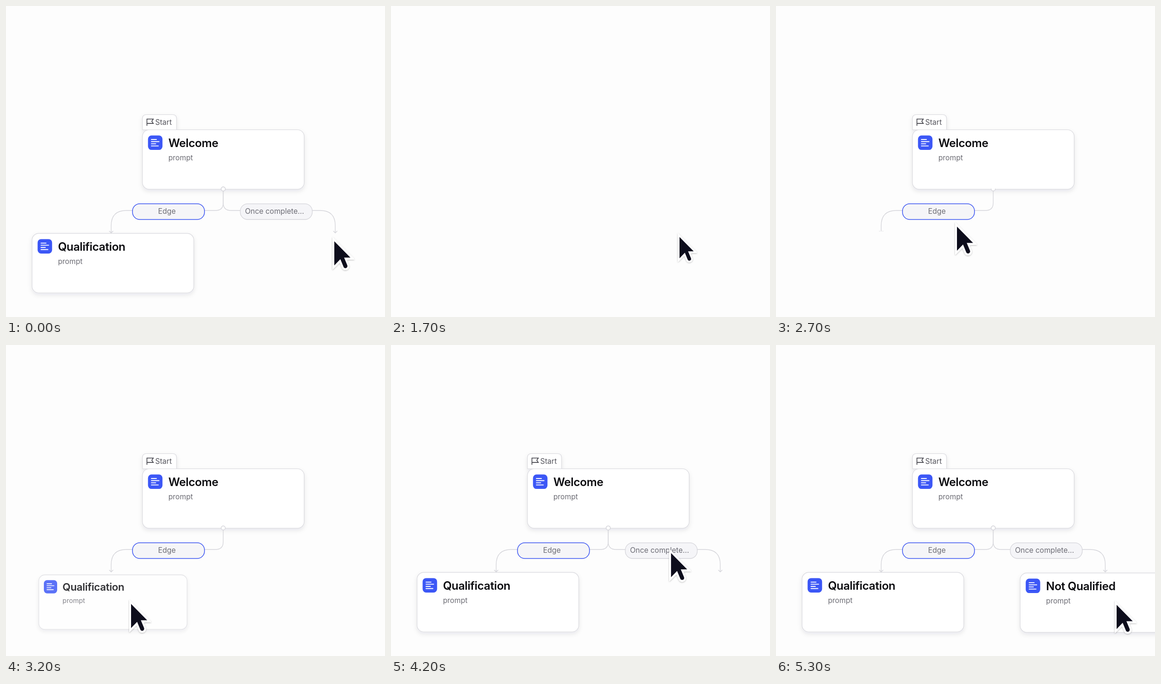
Write an HTML page that moves like this. It is 800 px wide and 657 px high and loops after 5400 ms.

```html
<!DOCTYPE html>
<html lang="en">
<head>
<meta charset="utf-8">
<title>Flow builder</title>
<style>
  html, body { margin: 0; width: 100%; height: 100%; overflow: hidden; background: #fdfdfd; }
  svg { display: block; width: 100%; height: 100%; }
  text { font-family: Inter, "Noto Sans", sans-serif; font-size: 15.5px; fill: #6c6c74; }
  .title { font-size: 24px; font-weight: 600; letter-spacing: -.4px; fill: #0b0b0f; }
  .small { font-size: 15.3px; }
  .box { fill: #fff; stroke: #d9d9de; stroke-width: 1.2; }
  .line { fill: none; stroke: #d6d6db; stroke-width: 1.4; }
  .pill { fill: #f5f5f8; stroke: #d6d6db; stroke-width: 1.3; }
  .active { stroke: #4059f2; stroke-width: 1.5; }
</style>
</head>
<body>
<svg id="stage" viewBox="0 0 800 657">
  <defs>
    <filter id="soft" x="-20%" y="-30%" width="140%" height="170%">
      <feDropShadow dx="0" dy="4" stdDeviation="5" flood-color="#20203a" flood-opacity=".09"/>
    </filter>
    <filter id="lift" x="-40%" y="-40%" width="180%" height="180%">
      <feDropShadow dx="0" dy="1" stdDeviation="1.6" flood-color="#000" flood-opacity=".28"/>
    </filter>
    <clipPath id="clip0"><rect x="0" width="800"/></clipPath>
    <clipPath id="clip1"><rect x="0" width="800"/></clipPath>
  </defs>
  <g id="cards"></g>
  <g id="edges"></g>
  <g id="cursor" filter="url(#lift)">
    <g fill="#fff" stroke="#fff" stroke-width="7.5">
      <path d="M0 0V51L13 38.5L34 34Z"/>
      <path d="M0 0V51L16 35H34Z"/>
      <path d="M15 33L23.5 53" stroke-width="16" stroke-linecap="round"/>
    </g>
    <path d="M0 0V51L16 34.5H34Z" fill="#0e0b1c"/>
    <path d="M15 32L23.5 52.5" stroke="#0e0b1c" stroke-width="8.5" stroke-linecap="round"/>
  </g>
</svg>
<script>
const LOOP = 5400, RESET = 1700, CYCLE = 4500, STEP = 100;
const $ = id => document.getElementById(id);

const cards = [
  { title: "Welcome", x: 458.7, y: 324.3, at: 1760, tab: true },
  { title: "Qualification", x: 225.7, y: 543.2, at: 2840 },
  { title: "Not Qualified", x: 686, y: 544.3, at: 4590 }
];

const edges = [
  { at: 2390, x: 267, label: "Edge", labelX: 321, active: "active",
    path: "M458.5 387V416Q458.5 432 442 432H254Q222 432 222 464V479",
    tip: 222 },
  { at: 3800, x: 494.5, label: "Once complete...", labelX: 504.5, active: "",
    path: "M458.5 387V416Q458.5 432 475 432H663Q695 432 695 464V479",
    tip: 695 }
];

// time, x, y, scale
const cursorKeys = [
  [1700, 609, 488, .88],
  [2150, 493, 336, 1],
  [2300, 487, 342, 1],
  [2700, 382, 466, 1],
  [2800, 351, 498, 1],
  [3150, 264, 547, 1],
  [3450, 264, 547, 1],
  [3800, 362, 487, 1],
  [4050, 500, 438, 1],
  [4300, 640, 442, 1],
  [4500, 693, 497, 1],
  [4600, 705, 518, 1],
  [5000, 719, 549, 1],
  [6200, 719, 549, 1]
];

const tabMarkup = `
  <path class="box" d="M-170.7 -62.8V-86.5Q-170.7 -94.8 -162.4 -94.8H-107Q-98.7 -94.8 -98.7 -86.5V-62.8Z"/>
  <path d="M-161.2 -71.3V-85.5H-147.8L-151 -80.8L-147.8 -76.2H-161.2" fill="none" stroke="#45454d" stroke-width="1.6"/>
  <text x="-143.7" y="-73.3" style="fill:#55555d">Start</text>`;

const cardMarkup = c => `<g>
  <g filter="url(#soft)">
    <rect class="box" x="-170.7" y="-62.8" width="341.4" height="125.6" rx="14"/>
    ${c.tab ? tabMarkup : ""}
  </g>
  <rect x="-159" y="-50.8" width="30.6" height="30.6" rx="7.5" fill="#3c57f6"/>
  <path d="M-152.5 -42.3h12M-152.5 -37.8h17.5M-152.5 -33.2h10.5M-152.5 -28.7h16" stroke="#fff" stroke-width="1.8"/>
  <text class="title" x="-116" y="-26">${c.title}</text>
  <text class="small" x="-116" y="1.9">prompt</text>
</g>`;

const edgeMarkup = (e, i) => `<g clip-path="url(#clip${i})">
  <path class="line" d="${e.path}"/>
  <path class="line" d="M${e.tip - 4.2} 475.3l4.2 4.2l4.2 -4.2"/>
  <circle class="line" cx="458.5" cy="386.5" r="4.3" style="fill:#fff"/>
  <g>
    <rect class="pill ${e.active}" x="${e.x}" y="417.8" width="152" height="33.2" rx="15.5"/>
    <text x="${e.labelX}" y="439.4">${e.label}</text>
  </g>
</g>`;

$("cards").innerHTML = cards.map(cardMarkup).join("");
$("edges").innerHTML = edges.map(edgeMarkup).join("");

const easeOut = (t, start, dur) => {
  const p = Math.min(1, Math.max(0, (t - start) / dur));
  return 1 - (1 - p) ** 3;
};

const slope = (k, i, c) =>
  k[i] && k[i + 1] ? (k[i + 1][c] - k[i][c]) / (k[i + 1][0] - k[i][0]) : 0;

// Monotone tangent: flat at turning points and rests
const tangent = (k, i, c) => {
  const a = slope(k, i - 1, c), b = slope(k, i, c);
  if (i === 0) return b;
  return a * b > 0 ? 2 * a * b / (a + b) : 0;
};

function sample(k, t, c) {
  let i = 0;
  while (i < k.length - 2 && t >= k[i + 1][0]) i++;
  const span = k[i + 1][0] - k[i][0], s = (t - k[i][0]) / span, r = 1 - s;
  return r * r * (1 + 2 * s) * k[i][c] + s * s * (1 + 2 * r) * k[i + 1][c]
    + span * s * r * (r * tangent(k, i, c) - s * tangent(k, i + 1, c));
}

function draw(ms) {
  const t = ms < RESET ? ms + CYCLE : ms;

  cards.forEach((c, i) => {
    const p = easeOut(t, c.at, 800), el = $("cards").children[i];
    el.setAttribute("transform", `translate(${c.x} ${c.y}) scale(${.5 + p / 2})`);
    el.setAttribute("opacity", p);
  });

  edges.forEach((e, i) => {
    const p = easeOut(t, e.at, 600), half = 51 * p;
    const el = $("edges").children[i], clip = $("clip" + i).firstChild;
    clip.setAttribute("y", 431 - half);
    clip.setAttribute("height", 2 * half);
    el.lastElementChild.setAttribute("opacity", Math.min(1, p * 1.5));
  });

  const [x, y, s] = [1, 2, 3].map(c => sample(cursorKeys, t, c));
  $("cursor").setAttribute("transform", `translate(${x} ${y}) scale(${s})`);
}

const begin = performance.now();
function tick() {
  const ms = Math.max(0, performance.now() - begin) + 4;
  draw(Math.floor(ms % LOOP / STEP) * STEP);
  requestAnimationFrame(tick);
}
tick();
</script>
</body>
</html>
```
